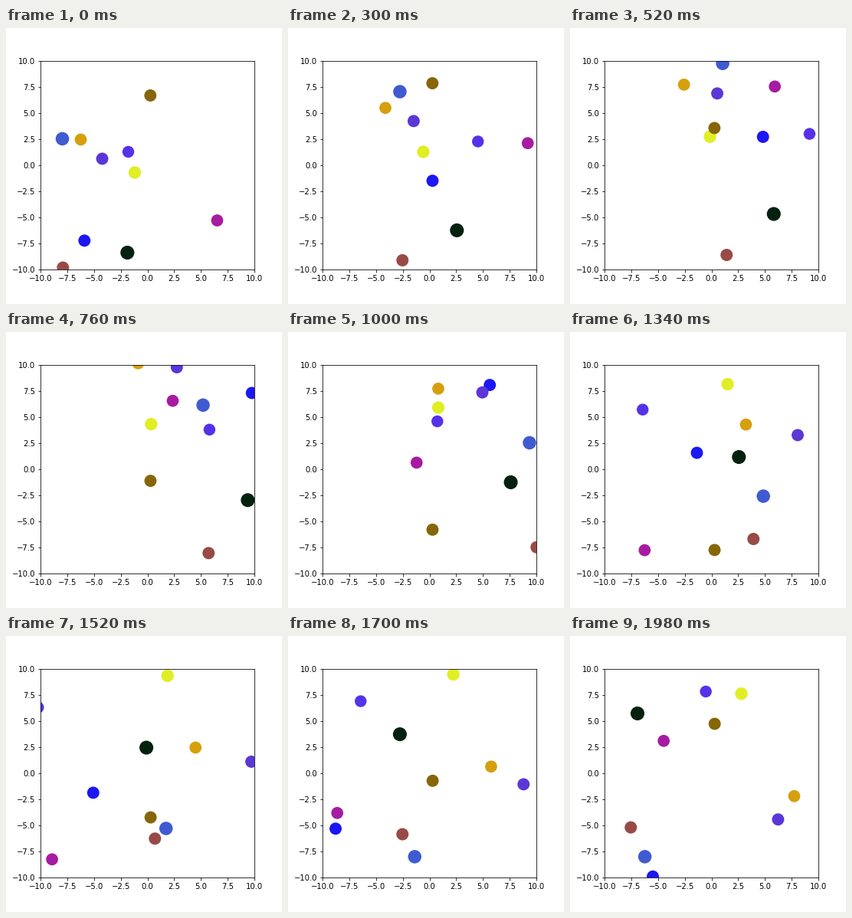
A matplotlib script that plays this animation: 360 px wide and 360 px high, repeating every 2 s.

```python
import matplotlib.pyplot as plt
import numpy as np
from matplotlib.animation import FuncAnimation

FRAMES = 100
LIMIT = 10

# x, y, vx, vy, diameter, colour
BALLS = [
    (-7.957, 2.546, 0.34624, 0.3014, 16.0, "#405bd2"),
    (-6.237, 2.472, 0.1412, 0.2027, 14.2, "#d69f0c"),
    (-5.893, -7.226, 0.4120, 0.3830, 14.4, "#1c17f3"),
    (-4.229, 0.633, 0.1835, 0.2410, 14.4, "#5b37d8"),
    (-1.792, 1.295, 0.4217, 0.0662, 13.9, "#5631ea"),
    (-1.183, -0.692, 0.0402, 0.1323, 14.8, "#e1ee25"),
    (0.272, 6.704, 0.0003, 0.3905, 14.4, "#876607"),
    (6.520, -5.291, 0.2969, 0.4944, 14.2, "#a61ba2"),
    (-1.878, -8.381, 0.2963, 0.1427, 16.6, "#03210e"),
    (-7.900, -9.816, 0.3584, 0.0467, 14.5, "#984b46"),
]


def simulate(pos, vel):
    """Move in whole steps; a ball turns back once it has passed a wall."""
    path = [pos.copy()]
    for _ in range(FRAMES - 1):
        pos = pos + vel
        vel = np.where(np.abs(pos) > LIMIT, -np.sign(pos) * np.abs(vel), vel)
        path.append(pos)
    return path


state = np.array([b[:4] for b in BALLS])
path = simulate(state[:, :2], state[:, 2:])

fig = plt.figure(figsize=(5, 5), dpi=72, facecolor="white")
ax = fig.add_axes([0.125, 0.125, 0.775, 0.755])
ticks = np.arange(-LIMIT, LIMIT + 0.1, 2.5)
ax.set(xlim=(-LIMIT, LIMIT), ylim=(-LIMIT, LIMIT), xticks=ticks, yticks=ticks)

dots = ax.scatter(*path[0].T, s=[b[4] ** 2 for b in BALLS],
                  c=[b[5] for b in BALLS], linewidths=1.5)


def update(i):
    dots.set_offsets(path[i])
    return (dots,)


anim = FuncAnimation(fig, update, frames=FRAMES, interval=20, repeat=True)
plt.show()
```
